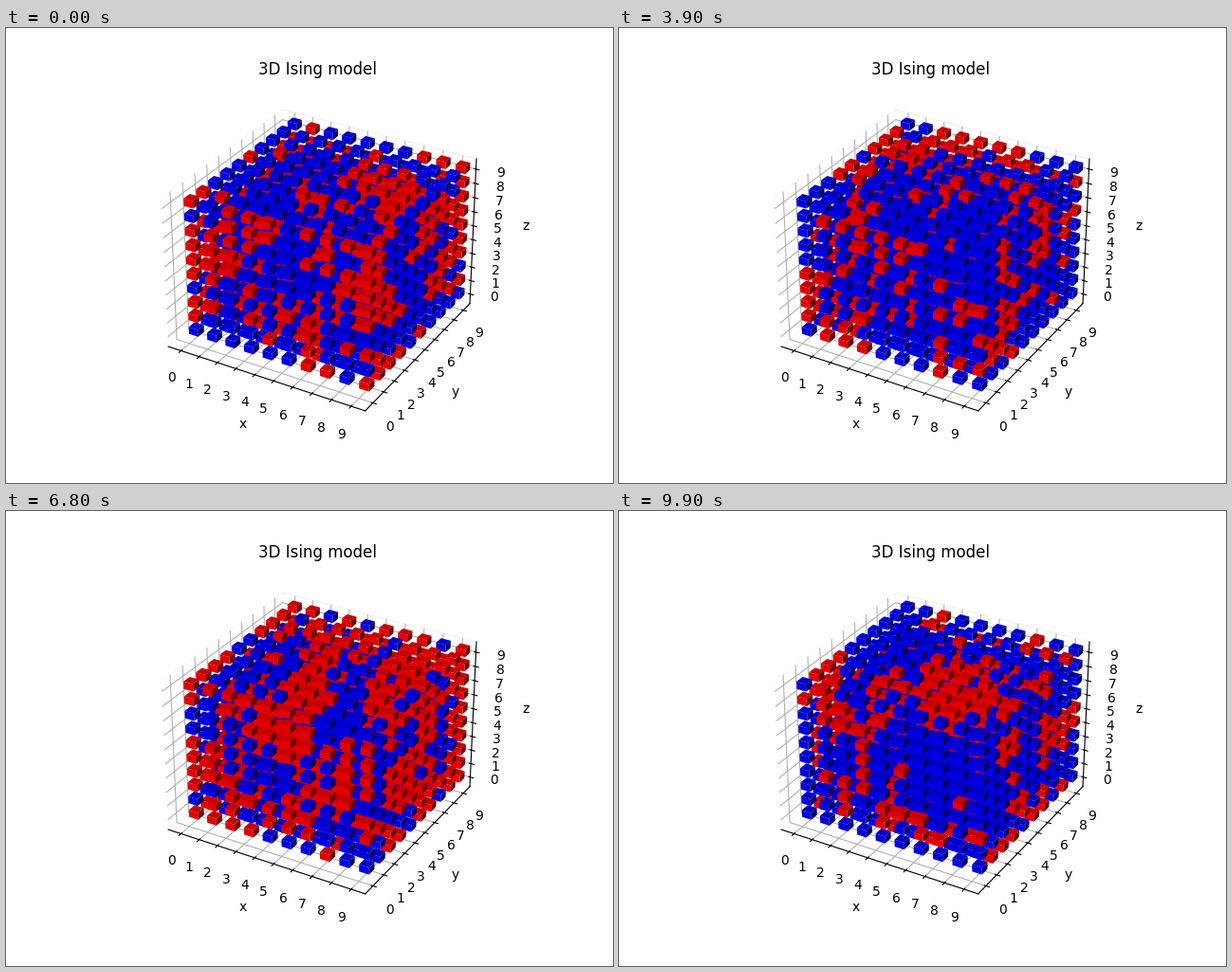
Write a matplotlib script that moves like this. It is 640 px wide and 480 px high and loops after 10000 ms.

```python
import numpy as np
import matplotlib.pyplot as plt
from matplotlib.animation import FuncAnimation
from mpl_toolkits.mplot3d.art3d import Poly3DCollection

N = 10            # lattice edge
FRAMES = 100
SIZE = 0.5        # cube edge
TEMP = 4.8        # just above the critical temperature

RED, BLUE = np.array([1.0, 0, 0]), np.array([0, 0, 1.0])

grid = np.indices((N, N, N))
sites = grid.reshape(3, -1).T
even = grid.sum(axis=0) % 2 == 0


def sweep(spins, rng):
    """One heat-bath sweep over both sublattices, periodic edges."""
    for mask in (even, ~even):
        local = sum(np.roll(spins, d, axis)
                    for axis in range(3) for d in (-1, 1))
        p_up = 1 / (1 + np.exp(-2 * local / TEMP))
        fresh = np.where(rng.random(spins.shape) < p_up, 1, -1)
        spins = np.where(mask, fresh, spins)
    return spins


def simulate(warmup=20):
    rng = np.random.default_rng(7)
    spins = rng.choice([-1, 1], (N, N, N))
    states = []
    for step in range(warmup + FRAMES):
        spins = sweep(spins, rng)
        states.append(spins)
    return states[warmup:]


def face(axis, side):
    """Unit-cube face normal to an axis, at coordinate 0 or 1."""
    corners = np.array([(0, 0), (1, 0), (1, 1), (0, 1)])
    return np.insert(corners, axis, side, axis=1)


# The faces turned to the viewer: right, front, top
VISIBLE = [(0, 1), (1, 0), (2, 1)]
FACES = np.array([face(axis, side) for axis, side in VISIBLE])
LIGHT = np.array([-2, -2, 1]) / 3
SHADE = np.array([0.65 + 0.35 * (2 * side - 1) * LIGHT[axis]
                  for axis, side in VISIBLE])


def face_colors(spins):
    base = np.where(spins.reshape(-1, 1) > 0, RED, BLUE)
    return (base[:, None, :] * SHADE[:, None]).reshape(-1, 3)


states = simulate()

fig = plt.figure(figsize=(6.4, 4.8), dpi=100)
ax = fig.add_subplot(projection="3d")
ax.set_title("3D Ising model")

verts = (sites[:, None, None, :] + SIZE * FACES).reshape(-1, 4, 3)
cubes = Poly3DCollection(verts, facecolors=face_colors(states[0]),
                         linewidths=0)
ax.add_collection3d(cubes)

pad = 0.5 + N / 48
for name in "xyz":
    ax.set(**{f"{name}lim": (-pad, N - 1 + pad),
              f"{name}ticks": range(N),
              f"{name}label": name})
for axis in (ax.xaxis, ax.yaxis, ax.zaxis):
    axis.pane.fill = False


def update(step):
    cubes.set_facecolor(face_colors(states[step]))
    return [cubes]


anim = FuncAnimation(fig, update, frames=FRAMES, interval=100, repeat=True)
plt.show()
```
